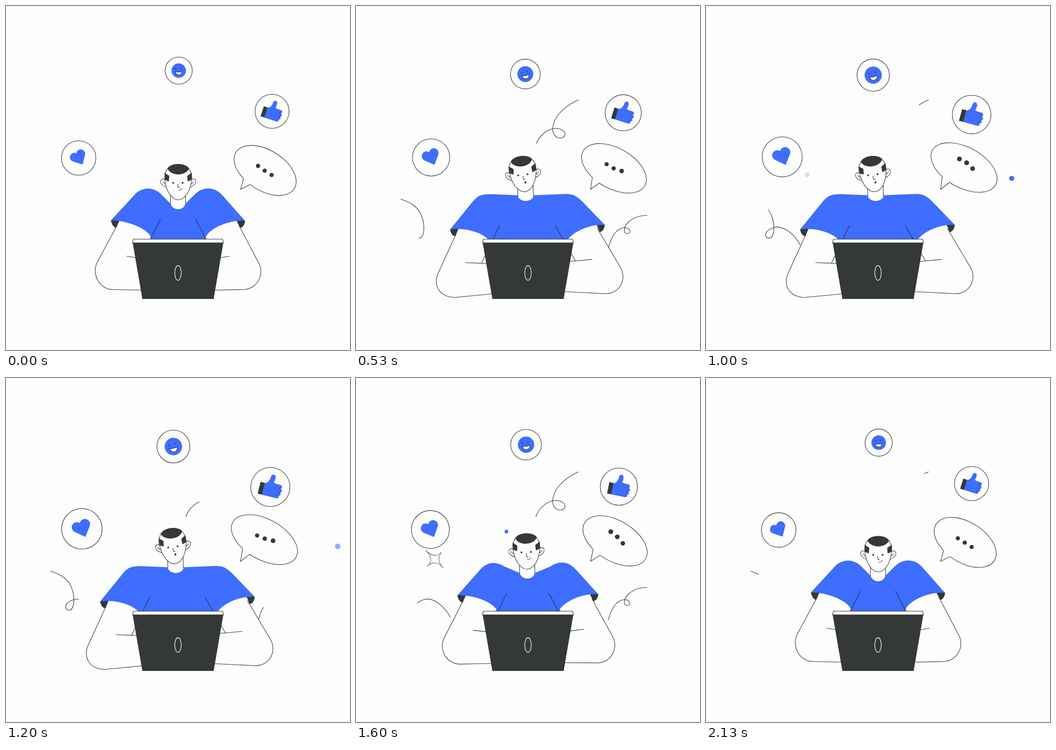
An HTML page that plays this animation: 748x748 px, repeating every 2.19 s.

```html
<!DOCTYPE html>
<html lang="en">
<head>
<meta charset="utf-8">
<title>Busy at the laptop</title>
<style>
html, body { margin: 0; width: 100%; height: 100%; overflow: hidden; background: #fdfdfd; }
svg { display: block; width: 100vw; height: 100vh; }
.line { fill: none; stroke: #26292b; stroke-width: 1.1; stroke-linejoin: round; vector-effect: non-scaling-stroke; }
.paper { fill: #fdfdfd; }
.blue { fill: #3e6dff; }
.dark { fill: #343938; }
</style>
</head>
<body>
<svg id="stage" viewBox="0 0 748 748"></svg>
<script>
const LOOP = 2190, FRAMES = 33;
const stage = document.getElementById('stage');

function add(parent, tag, attrs) {
  const el = document.createElementNS('http://www.w3.org/2000/svg', tag);
  set(el, attrs || {});
  parent.appendChild(el);
  return el;
}
function set(el, attrs) {
  for (const k in attrs) el.setAttribute(k, attrs[k]);
}
const group = (parent = stage) => add(parent, 'g');
const path = (parent, cls, d) => add(parent, 'path', { class: cls, d: d || '' });
const dot = (parent, cls, cx, cy, r) => add(parent, 'circle', { class: cls, cx, cy, r });
const show = (el, on) => { el.style.display = on ? '' : 'none'; };
const clamp = v => Math.min(1, Math.max(0, v));
const lerp = (a, b, u) => a + (b - a) * u;
const smooth = u => { u = clamp(u); return u * u * (3 - 2 * u); };

// Blends two path strings that share one structure
function mix(a, b, u) {
  const nums = b.match(/-?[\d.]+/g);
  let n = 0;
  return a.replace(/-?[\d.]+/g, v => lerp(+v, +nums[n++], u).toFixed(2));
}

// Smooth cyclic curve through values at fixed frames
const KEYS = [0, 4, 12, 18, 22, 27];
function curve(values, f) {
  const n = KEYS.length;
  const at = i => KEYS[(i + n) % n] + FRAMES * Math.floor(i / n);
  const val = i => values[(i + n) % n];
  const slope = i => (val(i + 1) - val(i - 1)) / (at(i + 1) - at(i - 1));
  let i = n - 1;
  while (KEYS[i] > f) i--;
  const h = at(i + 1) - at(i), u = (f - at(i)) / h, w = 1 - u;
  return val(i) * (1 + 2 * u) * w * w + slope(i) * h * u * w * w
    + val(i + 1) * u * u * (3 - 2 * u) - slope(i + 1) * h * u * u * w;
}

// Squiggles that draw themselves and then run out
const squiggles = [
  { d: 'M205,520C190,492 165,476 147,482C128,488 124,503 137,505C149,504 150,478 144,460C137,437 119,427 97,420',
    period: 11, head: [0, .2], tail: [5.7, .213] },
  { d: 'M391,302C397,283 416,266 436,266C455,267 461,284 446,287C430,288 424,272 430,255C436,235 458,215 484,204',
    period: 16.5, head: [0, .139], tail: [7.87, .125] },
  { d: 'M549,526C554,505 565,483 583,482C597,482 600,494 590,495C580,495 582,480 592,470C602,461 616,455 633,455.5',
    period: 16.5, head: [.4, .17], tail: [8.55, .16] }
];
squiggles.forEach(s => {
  s.el = path(stage, 'line', s.d);
  s.el.setAttribute('pathLength', 1);
});
function drawSquiggle(s, f) {
  const k = f % s.period;
  const head = clamp((k - s.head[0]) * s.head[1]);
  const tail = clamp((k - s.tail[0]) * s.tail[1]);
  show(s.el, head > tail);
  s.el.setAttribute('stroke-dasharray', `0 ${tail} ${head - tail} 2`);
}

// Things flung out from behind the person
function envelope(g) {
  path(g, 'line paper', 'M-60,-45C-37,-43 -11,-52 4,-69L59,47C46,71 17,77 -9,67Z');
  path(g, 'line', 'M-60,-45L7,-2Q11,1 10,3C8,26 -3,48 -9,67M4,-69L-4,-9M7,21L59,47');
}
function star(g) {
  path(g, 'line', 'M-31,-28Q-1,-1 23,-26Q4,-1 32,27Q2,-3 -23,26Q2,0 -31,-28Z');
}
const bead = g => dot(g, 'blue', 0, 0, 5.5);

const flyers = [
  { make: envelope, t0: 0, life: 8, n: 1.7, from: [340, 410], to: [203, 89], size: [.6, 1.18], turn: [-20, 8.9] },
  { make: star, t0: 0, life: 5, n: 3, from: [374, 420], to: [504, 145], size: [.2, 1], turn: [-30, 0] },
  { make: bead, t0: 9.5, life: 6, n: 3, from: [374, 420], to: [220, 367], size: [.6, 1], turn: [0, 0] },
  { make: bead, t0: 11, life: 9, n: 3, from: [374, 420], to: [725, 365.5], size: [.6, 1.1], turn: [0, 0] },
  { make: star, t0: 19, life: 7, n: 1.7, from: [374, 420], to: [143, 391], size: [.25, .68], turn: [-25, 8] },
  { make: bead, t0: 23, life: 6, n: 1.7, from: [374, 420], to: [198, 97], size: [.6, 1.08], turn: [0, 0] }
];
flyers.forEach(o => { o.g = group(); o.make(o.g); });
function drawFlyer(o, f) {
  const p = (f - o.t0) / o.life, e = 1 - Math.pow(1 - clamp(p), o.n);
  const x = lerp(o.from[0], o.to[0], e), y = lerp(o.from[1], o.to[1], e);
  show(o.g, p > 0 && p < 1);
  set(o.g, {
    transform: `translate(${x} ${y}) rotate(${lerp(...o.turn, e)}) scale(${lerp(...o.size, e)})`,
    opacity: clamp((1 - p) / .4)
  });
}

// Round badges
function heart(g) {
  path(g, 'blue', 'M0,15.5L-15,-.4A9.6,9.6 0 1 1 0,-12.3A9.6,9.6 0 1 1 15,-.4Z');
}
function smile(g) {
  dot(g, 'blue', 0, 0, 15.7);
  dot(g, 'dark', -7, -3.8, 1.2);
  dot(g, 'dark', 4.5, -4.5, 1.2);
  path(g, 'line', 'M-7.5,2.5Q0,4 7,2C6.3,11.5 -5,12.3 -7.5,2.5Z').style.fill = '#fff';
}
function thumb(g) {
  path(g, 'dark', 'M-20.3,-5H-11.5V18H-20.3Z');
  path(g, 'blue', 'M-12,-4.5C-6,-6 -4,-12 -3.5,-19C-3.5,-26 5,-26 5.5,-19C5.8,-15 5,-11 4,-8.5'
    + 'L17,-8.5C22.5,-8.5 22.5,-2.5 19.5,-1.5C24.5,-.5 24,5.5 20,6C24,7.5 22.5,12.5 18.5,12.5C21.5,14.5 19.5,18 15.5,18L-12,18Z');
  path(g, 'line', 'M3.5,-8.5H8M19.5,-1.5H15.5M20,6H16M18.5,12.5H15').style.strokeWidth = .8;
}
const badges = [
  { make: heart, base: 37.5, shift: [.9, .7],
    x: [158, 160.5, 165.5, 165, 163, 160], y: [330.5, 330, 328.5, 328, 329, 330],
    r: [37.5, 38.5, 42.5, 44, 42.5, 39.5], turn: [-29, -25, -22, -22, -23, -26] },
  { make: smile, base: 29.5, shift: [0, 0],
    x: [375.5, 372.5, 364.5, 364, 367.5, 373], y: [140.5, 144.5, 150.5, 149, 146.5, 143],
    r: [29.5, 30.5, 34.2, 35.7, 34.5, 31.6], turn: [0, -4, -10, -11, -9, -4] },
  { make: thumb, base: 37, shift: [0, 0],
    x: [578.5, 581, 580, 574.8, 572, 572.3], y: [229, 230, 234.5, 237, 237, 234.5],
    r: [37, 37.7, 41, 42.5, 41.4, 39], turn: [18, 18, 17, 14, 12, 12] }
];
badges.forEach(b => {
  b.ring = dot(stage, 'line paper', 0, 0, 1);
  b.g = group();
  b.make(b.g);
});
function drawBadge(b, f) {
  const [x, y, r, turn] = [b.x, b.y, b.r, b.turn].map(v => curve(v, f));
  set(b.ring, { cx: x, cy: y, r });
  b.g.setAttribute('transform',
    `translate(${x + b.shift[0]} ${y + b.shift[1]}) rotate(${turn}) scale(${r / b.base})`);
}

// Speech bubble with three bouncing dots
const bubble = {
  x: [563.5, 562, 560.5, 562, 563, 563.5], y: [357.5, 355, 351.5, 351.5, 353, 356],
  a: [74.7, 76, 77.8, 78.7, 78, 75.6], turn: [32, 30.8, 28.4, 29.2, 30, 32], b: 44
};
const bubbleEl = path(stage, 'line paper');
const typing = [0, 1, 2].map(() => dot(stage, 'dark', 0, 0, 4.5));
const BOUNCES = [3.3, 14.1, 23.8];
function drawBubble(f) {
  const [x, y, a, turn] = [bubble.x, bubble.y, bubble.a, bubble.turn].map(v => curve(v, f));
  const rad = Math.PI / 180, c = Math.cos(turn * rad), s = Math.sin(turn * rad);
  const rim = deg => {
    const u = a * Math.cos(deg * rad), v = bubble.b * Math.sin(deg * rad);
    return `${x + u * c - v * s},${y + u * s + v * c}`;
  };
  bubbleEl.setAttribute('d', `M${rim(114)}L510,398.8L${rim(99)}A${a},${bubble.b} ${turn} 1 0 ${rim(114)}Z`);
  typing.forEach((el, j) => {
    let hop = 0;
    for (const t of BOUNCES) {
      const d = Math.min(4, Math.abs(f - t - j * 1.2));
      hop += .5 + .5 * Math.cos(Math.PI * d / 4);
    }
    set(el, { cx: x - 16 + j * 15 + 6.8 * hop, cy: y - 9 + j * 9.5 - 11 * hop, r: 4.6 + .7 * hop });
  });
}

// Body parts, each in three poses: calm, startled, alert
const body = [
  { cls: 'line paper', poses: [
    'M241,478L198,558C186,583 203,616 232,616.5L300,618',
    'M207,503L178,587C167,617 188,643 216,641L300,628.5',
    'M218,495L180,578C163,611 188,636 217,633.5L300,625.5'] },
  { cls: 'line paper', poses: [
    'M507,478L549,558C564,584 545,616 517,616.5L450,618',
    'M536,493L577,577C590,607 570,635 541,632.5L450,624.5',
    'M525,484L576,570C590,598 570,627 541,625.5L450,621'] },
  { cls: 'dark', poses: [
    'M228,466C230,476 235,482 239.5,482.5L248,464Z',
    'M196,493C198,503 203,507 208.5,507.5L215,488Z',
    'M204.5,485C206,496 211,500 216,500.5L224,482Z'] },
  { cls: 'dark', poses: [
    'M520,467C519,476 514,482 509,482.5L500,464Z',
    'M550,484C549,493 545,497 540,497.5L531,481Z',
    'M541,475.5C540,486 535,491 530,491.5L522,473Z'] },
  { cls: 'line', poses: [
    'M357.5,405L357.5,431M390.5,431L390.5,405',
    'M350,378L351,403M384.5,402L384,372',
    'M351,388L352,413M385.5,413L385,384'] },
  { cls: 'blue', poses: [
    'M228,466.5L279,411C295,393 321,392 339,411L358,430C363,446 386,446 390,430L409,411C427,392 453,392 470,411L520,467.5C501,463 449,476 434,502L437,510L312,510L315,502C303,478 247,464 228,466.5Z',
    'M196,494L240,431C256,409 263,405 305,403L351,401C353,416 384,416 385,400.5L435,403C482,408 489,411 501,425L550,485C519,483 488,494 470,508L471,510L275,510L277,507C256,491 218,487 196,494Z',
    'M204.5,486L250,430C264,413 268,410 292,409L352,411.5C353,428 385,428 386,411.5L448,409C470,408 476,410 492,425L541,476C507,474 475,490 462,506L463,510L284,510L286,506C266,488 228,482 204.5,486Z'] },
  { cls: 'line', poses: [
    'M336,463L294,546M412,463L455,546',
    'M302,476L268,564M443,476L483,558',
    'M312,477L273,559M433,477L477,554'] },
  { cls: 'line', poses: [
    'M262,544L284,547.5M466,547.5L486,544',
    'M236,564L286,564M464,559.5L516,557',
    'M238,558L286,560M464,555.5L514,551'] }
];
body.forEach(b => { b.el = path(stage, b.cls); });

const head = group();
const headPoses = ['374.5,382.5,0', '362.3,354,-7', '363.3,365,-7'];
for (const side of [1, -1]) {
  const g = group(head);
  g.setAttribute('transform', `scale(${side} 1)`);
  path(g, 'line paper', 'M-27,-4C-36,-11 -42,-2 -36,5C-32,10 -28,11 -24,12');
  path(g, 'line', 'M-34,-1L-28.5,5');
}
path(head, 'line paper', 'M-29.5,-8C-30,-30 -15,-38.5 0,-38.5C15,-38.5 29.5,-30 29.5,-8C27,22 13,39 0,39C-13,39 -27,22 -29.5,-8Z');
path(head, 'dark', 'M-23.5,-29.5C-16,-42 16,-42 23.5,-29.5C17,-12 -17,-12 -23.5,-29.5Z');
for (const side of [1, -1]) {
  path(head, 'dark', 'M-29.5,-20C-27,-18 -22,-15 -19.5,-13L-20.5,-1L-28,-4C-29.5,-9 -30,-15 -29.5,-20Z')
    .setAttribute('transform', `scale(${side} 1)`);
}
path(head, 'line', 'M-1,4.5L-.5,12Q1.5,13.5 3.2,11.5');
const openEyes = group(head);
dot(openEyes, 'dark', -11, 2, 2);
dot(openEyes, 'dark', 9.5, 2, 2);
const shutEyes = path(head, 'line', 'M-13,3H-9M7.5,3H11.5');
const grin = path(head, 'line', 'M1,17.5C4.5,18.5 7.5,16.5 8.5,13.5');
const gasp = add(head, 'ellipse', { class: 'dark', rx: 1.9, ry: 2.7, transform: 'translate(2.8 19) rotate(25)' });

function drawBody(f) {
  let from = 0, to = 1, u = smooth(f / 4);
  if (f >= 4) { from = 1; to = 2; u = smooth((f - 4) / 4); }
  if (f >= 17) { from = 2; to = 0; u = smooth((f - 17.6) / 10.4); }
  const pose = list => mix(list[from], list[to], u);
  body.forEach(b => b.el.setAttribute('d', pose(b.poses)));
  const [x, y, turn] = pose(headPoses).split(',');
  head.setAttribute('transform', `translate(${x} ${y}) rotate(${turn})`);
  const blink = f >= 21 && f <= 23, startled = f >= 2 && f < 24;
  show(openEyes, !blink);
  show(shutEyes, blink);
  show(gasp, startled);
  show(grin, !startled);
}

// Laptop
path(stage, 'dark', 'M275.5,515H472.5L451.5,637H296.5Z');
path(stage, 'line', 'M277,507H471L473,515H275Z').style.fill = '#fbf8fa';
set(add(stage, 'ellipse', { cx: 374, cy: 580.5, rx: 7, ry: 16 }), { fill: 'none', stroke: '#fff', 'stroke-width': 1.3 });

// Fifteen pictures a second, each starting on a whole 10 ms
function frameAt(t) {
  const i = Math.round(t * 3 / 200);
  return Math.round(i * 20 / 3) * 10 > t ? i - 1 : i;
}
function draw(f) {
  squiggles.forEach(s => drawSquiggle(s, f));
  flyers.forEach(o => drawFlyer(o, f));
  badges.forEach(b => drawBadge(b, f));
  drawBubble(f);
  drawBody(f);
}
const began = performance.now();
function tick() {
  draw(frameAt((performance.now() - began) % LOOP));
  requestAnimationFrame(tick);
}
tick();
</script>
</body>
</html>
```
